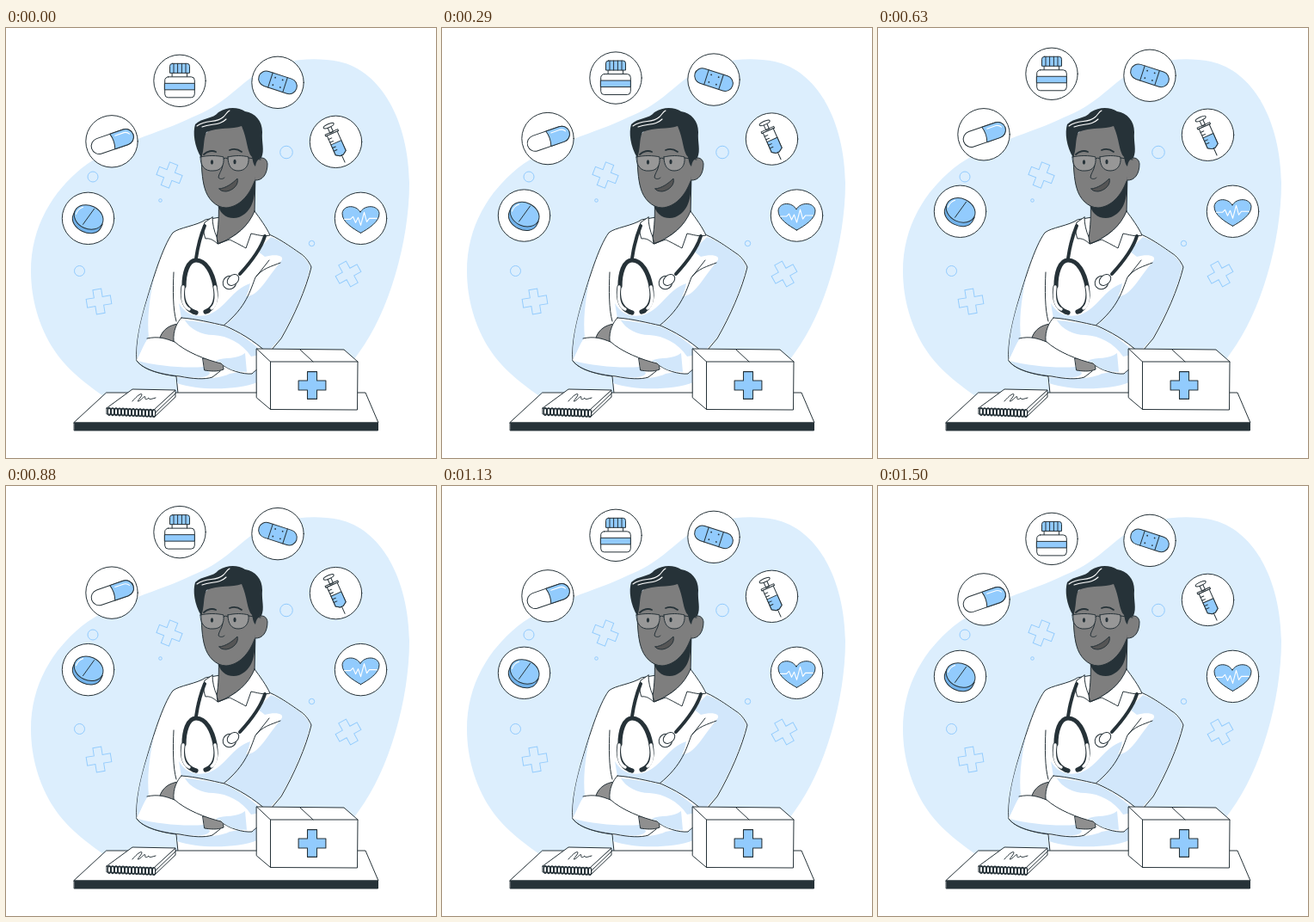
An HTML page for the animation above (1540 ms loop, 500 by 500 pixels).

```html
<!DOCTYPE html>
<html lang="en">
<head>
<meta charset="utf-8">
<style>
html, body { margin: 0; width: 100%; height: 100%; overflow: hidden; background: #fff; }
svg { display: block; width: 100vw; height: 100vh; }
.l { fill: none; stroke: #263238; stroke-width: 1; stroke-linecap: round; stroke-linejoin: round; }
.w { fill: #fff; }
.b { fill: #92cbfd; }
.s { fill: #d2e7fb; }
.g { fill: #7e7e7e; }
.hand { fill: #8f8f8f; }
.d { fill: #263238; }
.lens { fill: rgba(255, 255, 255, .2); }
.deco { fill: none; stroke: #92cbfd; stroke-width: 1; }
.shine { fill: none; stroke: #fff; stroke-width: 1.1; stroke-linecap: round; stroke-linejoin: round; }
.tube { fill: none; stroke: #263238; stroke-width: 4; stroke-linecap: round; }
.tube.thick { stroke-width: 5.2; }
.tube.core { stroke: #fff; stroke-width: 3.4; }
</style>
</head>
<body>
<svg viewBox="0 0 500 500">
  <defs>
    <path id="plus" d="M-5.2-15H5.2V-5.2H15V5.2H5.2V15H-5.2V5.2H-15V-5.2H-5.2Z"/>
  </defs>

  <path fill="#dceefd" d="M29 283C29 230 55 190 88 163C125 134 180 122 216 104C252 90 268 69 290 54C319 36 357 33 387 39C437 50 468 109 469 180C469 249 445 331 410 378C390 406 372 430 340 440H130C108 424 73 402 55 373C39 348 29 316 29 283Z"/>

  <g class="deco">
    <use href="#plus" transform="translate(190 171) rotate(21) scale(.95)"/>
    <use href="#plus" transform="translate(108 318) rotate(-9) scale(.95)"/>
    <use href="#plus" transform="translate(398 286) rotate(-29) scale(.95)"/>
    <circle cx="101" cy="173" r="6"/>
    <circle cx="85.5" cy="282.5" r="6"/>
    <circle cx="326" cy="144.5" r="7.3"/>
    <circle cx="179.5" cy="200.5" r="1.8"/>
    <circle cx="355.5" cy="250.5" r="3.2"/>
  </g>

  <!-- coat -->
  <path class="l w" d="M232 223C222 230 201 232 194 238C182 254 170 295 164 315C157 338 150 368 152 387C160 398 182 403 198 405L200 425H292V394L320 361C335 335 349 303 355 278C352 271 347 265 342 262C329 253 315 243 303 239L288 214Z"/>
  <path class="s" d="M308 243C320 247 333 256 342 263C347 266 351 272 354 278C348 303 334 335 319 361L306 375H276L255 346C268 336 275 322 279 312C294 312 303 291 320 271C325 265 314 262 301 266L292 259Z"/>
  <path class="s" d="M201 320C209 334 222 337 236 333C255 326 263 304 284 297C280 318 267 337 254 346L204 338Z"/>
  <path class="s" d="M172 291C166 318 164 340 166 360C160 367 157 377 153 386C150 368 157 338 164 316Z"/>
  <path class="s" d="M199 406C224 408 246 409 260 402L292 396V412C270 421 224 422 199 413Z"/>
  <path class="l" d="M195 284C194 305 194 327 198 341M319 273C309 277 297 280 290 290C284 305 280 324 253 346M306 270L291 289"/>

  <!-- neck and collar -->
  <path class="l g" d="M247 197C248 216 247 232 245 244L247 251C262 245 278 234 289 217L290 171Z"/>
  <path class="d" d="M246 203C247 217 260 224 271 220C283 215 290 204 290 178L270 195Z"/>
  <path class="l w" d="M240 220L231 226C229 234 230 240 232 245C237 244 242 247 246 251L245 243C242 236 240 228 240 220Z"/>
  <path class="l w" d="M289 213C295 221 303 232 307 241C299 243 291 240 285 239L279 256C272 252 264 248 260 246L246 251C268 243 282 230 289 213Z"/>

  <!-- head -->
  <path class="l g" d="M290 156C293 149 303 149 304 158C304 169 299 178 289 177Z"/>
  <path class="g" d="M227 128C227 154 227 174 231 186C234 198 244 209 256 209C271 208 283 195 289 178L293 156L285 115L250 105Z"/>
  <path class="l" d="M227 143C227 160 228 176 231 186C234 198 244 209 256 209C271 208 283 195 289 178"/>
  <path class="d" d="M227 151C219 137 217 122 220 112C228 104 241 106 247 98C258 91 270 92 278 97C290 99 298 108 298 121C297 133 301 142 297 151C293 152 291 155 290 161C287 158 287 153 286 150C280 144 281 130 274 114C263 118 247 115 233 121C229 130 231 141 227 151Z"/>
  <path class="shine" d="M222 114C233 106 244 111 252 104C256 101 256 98 260 96M228 115C240 111 249 113 256 106"/>
  <g class="l">
    <path class="lens" d="M226 150C234 148 246 148 253 150C254 160 250 166 241 166C231 167 226 160 226 150Z"/>
    <path class="lens" d="M258 150C266 148 275 148 282 150C283 160 278 166 270 166C262 166 258 160 258 150Z"/>
    <path d="M253 152Q255.500 150 258 152M282 151L296 153M252 160C251 166 247 170 247 174C249 176 252 176 254 174"/>
  </g>
  <path class="l" style="stroke-width:1.800" d="M230 147C234 143 240 142 244 144M260 142C265 140 270 141 274 144"/>
  <ellipse class="d" cx="239.500" cy="156" rx="1.600" ry="2.800"/>
  <ellipse class="d" cx="266" cy="155.500" rx="1.600" ry="2.800"/>
  <path class="l" style="fill:#555" d="M248 187C256 186 263 181 269 175C271 182 264 189 256 190C252 190 249 189 248 187Z"/>

  <!-- stethoscope -->
  <path class="tube" d="M231 230C226 242 223 254 221 268M301 242C296 258 284 273 272 286"/>
  <path class="tube thick" d="M207 300C207 286 211 270 221 270C233 270 240 285 243 300"/>
  <path class="tube thick" d="M206 301C204 315 207 325 218 330M243 301C246 315 242 325 234 329"/>
  <path class="tube core" d="M206 301C204 315 207 324 213 327M243 301C246 315 243 323 239 326"/>
  <path class="tube thick" d="M218 330L221 331M235 329L232 330"/>
  <ellipse class="l w" cx="260" cy="296" rx="8" ry="7.500" transform="rotate(-40 260 296)"/>
  <ellipse class="l w" cx="264" cy="293" rx="7.500" ry="5.500" transform="rotate(-40 264 293)"/>

  <!-- crossed arms -->
  <path class="l hand" d="M179 360C182 351 190 345 201 344L198 365Z"/>
  <path class="w" d="M165 361C177 358 186 361 196 365C210 372 222 380 231 386L235 404C227 409 216 407 202 405C183 403 160 397 152 386Z"/>
  <path class="s" d="M153 387C176 393 208 396 230 394L237 401C236 408 216 407 202 405C183 403 160 398 153 387Z"/>
  <path class="l" d="M164 361C177 358 186 361 196 365M152 387C160 398 182 403 202 405C217 408 231 409 240 406L249 399"/>
  <path class="l hand" d="M229 384L252 386L253 397C246 400 237 399 231 398Z"/>
  <path class="l w" d="M204 337C220 338 240 343 254 346C270 353 288 363 304 378V390C297 393 290 398 286 402C276 403 258 398 250 390C233 386 209 377 195 364C194 352 199 342 204 337Z"/>
  <path class="s" d="M208 340C224 341 240 344 254 347C270 354 286 364 300 379L285 382C274 366 258 358 241 357C227 357 214 350 208 340Z"/>
  <path class="s" d="M243 387C255 382 268 386 278 378L280 400C266 400 256 396 250 389Z"/>

  <!-- table -->
  <path class="l w" d="M117 424H418L433 459H79Z"/>
  <path class="l d" d="M79.500 459H432.500V468H79.500Z"/>

  <!-- notepad -->
  <path class="l w" d="M117 442V449L173 452L197 429V421L172 443Z"/>
  <path class="l w" d="M117 442L147 420L197 421L172 444Z"/>
  <path class="l" d="M174 447L197 425M147 434C151 429 157 424 158 426C158 429 151 435 154 434C157 433 161 427 162 429C161 432 163 433 166 430C166 433 170 431 174 430"/>
  <g id="coil" class="l" style="stroke-width:1.400"></g>

  <!-- first aid box -->
  <g class="l">
    <path class="w" d="M291.500 373L393 374L409 388L408.500 444L307.500 443.500L291.500 430Z"/>
    <path d="M291.500 373L307.500 388H409M307.500 388V443.500M342 374L357 388"/>
    <use href="#plus" class="b" transform="translate(356 415.500) scale(1.060)"/>
  </g>

  <g id="float">
    <g transform="translate(202 61)">
      <circle class="l w" r="30.200"/>
      <rect class="l w" x="-8.500" y="-10" width="17" height="7"/>
      <rect class="l w" x="-17.300" y="-4.500" width="34.600" height="24" rx="4"/>
      <path class="l b" d="M-17.300 3H17.300V10.500H-17.300ZM-8.500-20H8.500Q11.500-20 11.500-17V-9H-11.500V-17Q-11.500-20-8.500-20Z"/>
      <path class="l" d="M-7-20V-9M-2.400-20V-9M2.400-20V-9M7-20V-9"/>
    </g>
    <g transform="translate(316 63)">
      <circle class="l w" r="30.200"/>
      <g transform="rotate(18)">
        <rect class="l b" x="-23" y="-9" width="46" height="18" rx="9"/>
        <path class="l" d="M-9-9V9M9-9V9"/>
        <g class="d"><circle cx="-4.500" cy="-4.500" r=".9"/><circle cx="4.500" cy="-4.500" r=".9"/><circle cx="-4.500" cy="4.500" r=".9"/><circle cx="4.500" cy="4.500" r=".9"/></g>
      </g>
    </g>
    <g transform="translate(123 131.500)">
      <circle class="l w" r="30.200"/>
      <g transform="translate(.8 .2) rotate(-19)">
        <rect class="l w" x="-25.500" y="-9.200" width="51" height="18.400" rx="9.200"/>
        <path class="l b" d="M0-9.200H16.300A9.200 9.200 0 0 1 16.300 9.200H0Q3 0 0-9.200Z"/>
        <path class="shine" d="M5-5.500H16Q20-5 21.500-2"/>
      </g>
    </g>
    <g transform="translate(383.500 132)">
      <circle class="l w" r="30.200"/>
      <g transform="rotate(-24)">
        <path class="l w" d="M-2-20H2V-12H-2ZM-8-12.500H8V-10.500H-8Z"/>
        <ellipse class="l w" cy="-20.500" rx="6.500" ry="2"/>
        <path class="l w" d="M-6.500-10.500H6.500V14L2 17H-2L-6.500 14Z"/>
        <path class="l b" d="M-6.500 1H6.500V14L2 17H-2L-6.500 14Z"/>
        <path class="l" d="M0 17V26M-6.500-6H-2.500M-6.500-2H-2.500M-6.500 5H-2.500M-6.500 9H-2.500"/>
      </g>
    </g>
    <g transform="translate(95.500 221)">
      <circle class="l w" r="30.200"/>
      <g transform="rotate(25)">
        <path class="l b" style="fill:#72b2ea" d="M-17.500-1V3C-17 21 18 21 18 3V-1Z"/>
        <ellipse class="l b" cy="-1.500" rx="17.500" ry="13.500"/>
      </g>
      <path class="l" d="M-6 7L7-11"/>
      <path class="shine" d="M-14-5Q-12-11-6-13"/>
    </g>
    <g transform="translate(412.500 221)">
      <circle class="l w" r="30.200"/>
      <path class="l b" d="M0 17C-9 12-22 4-21.500-6C-20-16-5-16-.5-7C4-16 20-16 21.500-6C22 4 9 12 0 17Z"/>
      <path class="shine" d="M-19 1H-12L-9-2L-6 5L-3-1L0 8L4-7L7 4L10 0H19"/>
    </g>
  </g>
</svg>
<script>
const loop = 1540, steps = 37, rate = 24 / 1000, lift = 4.25;
const coil = document.getElementById('coil');
const floaters = document.getElementById('float');

for (let i = 0; i < 14; i++) {
  const ring = document.createElementNS('http://www.w3.org/2000/svg', 'ellipse');
  ring.setAttribute('cx', 120 + i * 4);
  ring.setAttribute('cy', 446 + i * 0.15);
  ring.setAttribute('rx', 1.7);
  ring.setAttribute('ry', 4.3);
  coil.append(ring);
}

// The icons bob together, on a 24 fps clock.
function draw(now) {
  const step = Math.floor(((now % loop) + 5) * rate) % steps;
  const y = lift * (Math.cos((step + 1) / steps * 2 * Math.PI) - 1) + 0.4;
  floaters.setAttribute('transform', `translate(0 ${y.toFixed(2)})`);
}

let start;
function tick(now) {
  start ??= now;
  draw(now - start);
  requestAnimationFrame(tick);
}
draw(0);
requestAnimationFrame(tick);
</script>
</body>
</html>
```
